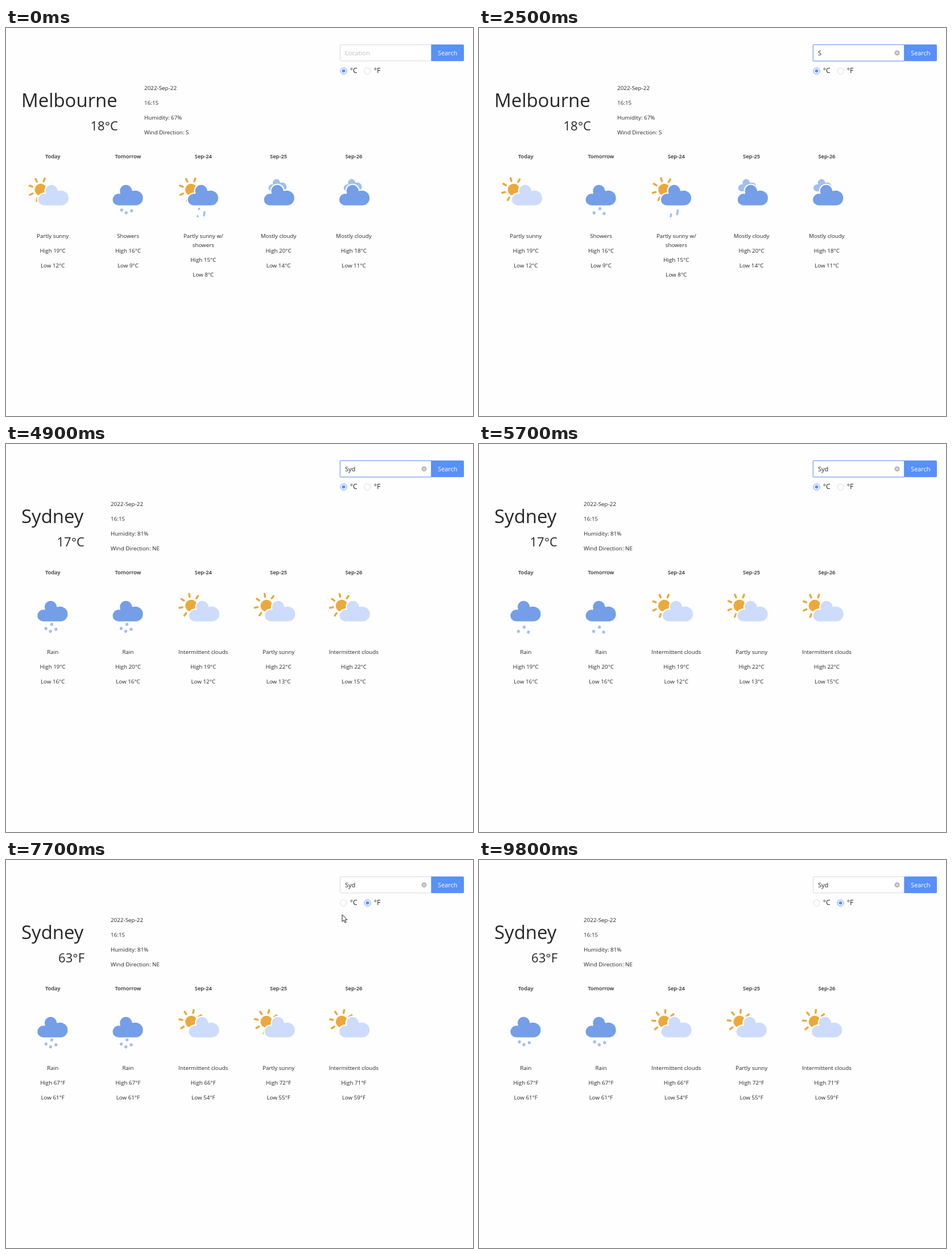
Recreate the animation shown at these times as an HTML page. Size 821x682 px, loop 9900 ms.

```html
<!DOCTYPE html>
<html lang="en">
<head>
<meta charset="utf-8">
<title>Weather</title>
<style>
  html, body { margin: 0; width: 100%; height: 100%; overflow: hidden; background: #fefefe; }
  svg { display: block; width: 821px; height: 682px; font-family: "Open Sans", "Noto Sans", sans-serif; }
</style>
</head>
<body>
<svg id="stage" viewBox="0 0 821 682"></svg>
<script>
const LOOP = 9900, TICK = 100;
const HOLDS = [13, 23, 35, 47, 58, 69, 81, 92]; // ticks that repeat the previous picture
const BLUE = '#5990f9', INK = '#262626', SUN = '#eba93b';
const CLOUD = '#749ee8', PALE = '#cddcfc', SOFT = '#a0bef4';
const CLOUD_PATH = 'M47.7 35.4c0-4.6-3.7-8.2-8.2-8.2c-1 0-1.9.2-2.8.5c-.3-3.4-3.1-6.2-6.6-6.2c-3.7 0-6.7 3-6.7 6.7c0 .8.2 1.6.4 2.3c-.3-.1-.7-.1-1-.1c-3.7 0-6.7 3-6.7 6.7c0 3.4 2.9 6.2 6.5 6.2l17.2 0C44.2 43.3 47.7 39.8 47.7 35.4z';

// Icon clocks: some icons were loaded before the loop, others with the second city.
const EARLY = -26.37, LATE = 4.03;
const DAYS = ['Today', 'Tomorrow', 'Sep-24', 'Sep-25', 'Sep-26'];
// label, icon, clock start, high and low in °C, high and low in °F
const MELBOURNE = {
  name: 'Melbourne', right: 197, info: 243, humidity: 67, wind: 'S', now: [18, 64],
  days: [
    ['Partly sunny', partlySunny, EARLY, 19, 12],
    ['Showers', rain, EARLY, 16, 9],
    ['Partly sunny w/|showers', sunShowers, EARLY, 15, 8],
    ['Mostly cloudy', cloudy, EARLY, 20, 14],
    ['Mostly cloudy', cloudy, EARLY, 18, 11]
  ]
};
const SYDNEY = {
  name: 'Sydney', right: 138, info: 184, humidity: 81, wind: 'NE', now: [17, 63],
  days: [
    ['Rain', rain, LATE, 19, 16, 67, 61],
    ['Rain', rain, LATE, 20, 16, 67, 61],
    ['Intermittent clouds', partlySunny, LATE, 19, 12, 66, 54],
    ['Partly sunny', partlySunny, EARLY, 22, 13, 72, 55],
    ['Intermittent clouds', partlySunny, LATE, 22, 15, 71, 59]
  ]
};
// Pointer path: time in s, x, y
const VISITS = [
  [[.2, 819, 24], [.5, 780, 38], [.9, 650, 44], [1.2, 628, 45]],
  [[5.9, 622, 46], [6.4, 639, 72], [6.9, 639, 72], [7.2, 622, 84], [7.5, 591, 96],
   [7.7, 591, 96], [7.9, 600, 55], [8, 604, 44], [8.2, 612, 6], [8.3, 615, -16]]
];

const clamp = v => Math.max(0, Math.min(1, v));
const wave = (s, period) => 1 - Math.abs(2 * (s % period) / period - 1);
const group = (transform, body) => `<g transform="${transform}">${body}</g>`;
const text = (x, y, size, str, attrs = '') =>
  `<text x="${x}" y="${y}" font-size="${size}" fill="${INK}" ${attrs}>${str}</text>`;
const middle = 'text-anchor="middle"';

let shaded = false; // soft shadows and rules show only briefly

function cloud(fill, transform) {
  const shape = `<path d="${CLOUD_PATH}" fill="${fill}" stroke="#fefefe" stroke-width="1.2" stroke-linejoin="round"/>`;
  const shadow = `<path d="${CLOUD_PATH}" fill="#f2f2f5" transform="translate(0 4)"/>`;
  return group(transform, (shaded ? shadow : '') + shape);
}
const frontCloud = (fill, dx = 0) => cloud(fill, `translate(${dx} -1)`);

function sun(s) {
  let rays = '';
  for (let a = 0; a < 360; a += 45) rays += `<path d="M0 9v3" transform="rotate(${a})"/>`;
  return group(`translate(20 26) rotate(${40 * s})`,
    `<g stroke="${SUN}" stroke-width="2" stroke-linecap="round">${rays}</g><circle r="6" fill="${SUN}"/>`);
}

function drops(s, x, lines, dash, width) {
  const body = lines.map(([dx, dy, delay]) => {
    const shift = -12.5 * (Math.max(0, s - delay) % 8);
    return `<path d="M0 0v8" transform="translate(${dx} ${dy})" stroke-dasharray="${dash}" stroke-dashoffset="${shift}"/>`;
  }).join('');
  return group(`translate(${x} 45) rotate(10)`,
    `<g stroke="${SOFT}" stroke-width="${width}" stroke-linecap="round">${body}</g>`);
}

function partlySunny(s) { return sun(s) + frontCloud(PALE, 2 * wave(s, 3)); }
function rain(s) {
  return frontCloud(CLOUD) + drops(s, 31, [[-5, 1, 0], [0, -1, .25], [5, 0, 0]], '.1 7', 3);
}
function sunShowers(s) {
  return sun(s) + frontCloud(CLOUD) + drops(s, 34, [[-6, 1, 0], [0, -1, .25]], '4 7', 2);
}
function cloudy(s) {
  return cloud(SOFT, `translate(${5 + 15 * wave(s, 7)} 2) scale(.6)`) + frontCloud(CLOUD, 2 * wave(s, 3));
}

function forecast(city, t, unit) {
  return city.days.map(([label, icon, start, ...temps], i) => {
    const x = 82.2 + 132.3 * i, lines = label.split('|');
    const [high, low] = unit === 'F' ? temps.slice(2) : temps;
    const y = 369.3 + 16 * (lines.length - 1);
    return text(x, 229.3, 9.35, DAYS[i], middle + ' font-weight="600"')
      + (shaded ? `<path d="M${x - 54} 239.5h108" stroke="#f3f3f3"/>` : '')
      + group(`translate(${x - 56.2} 238.8) scale(1.75)`, icon(Math.max(0, t - start)))
      + lines.map((line, n) => text(x, 369.3 + 16 * n, 9.75, line, middle)).join('')
      + text(x, y + 26, 9.8, `High ${high}°${unit}`, middle)
      + text(x, y + 52, 9.8, `Low ${low}°${unit}`, middle);
  }).join('');
}

function header(city, unit) {
  const info = ['2022-Sep-22', '16:15', `Humidity: ${city.humidity}%`, `Wind Direction: ${city.wind}`];
  return text(27, 139, 32.9, city.name)
    + text(city.right, 180, 22, `${city.now[unit === 'F' ? 1 : 0]}°${unit}`, 'text-anchor="end"')
    + info.map((line, i) => text(city.info, 108.6 + 26.1 * i, 9.85, line)).join('');
}

function radio(x, label, on, hover) {
  return `<circle cx="${x}" cy="75.5" r="5.6" fill="#fff" stroke="${on || hover ? BLUE : '#d9d9d9'}"/>`
    + (on ? `<circle cx="${x}" cy="75.5" r="3" fill="${BLUE}"/>` : '')
    + text(x + 11.3, 79.3, 12.3, label);
}

function searchBar(t) {
  const typed = 'Syd'.slice(0, (t >= 2) + (t >= 2.6) + (t >= 3.2));
  const focus = clamp((t - 1) / .2) * clamp((6.7 - t) / .3);
  const lastKey = [3.2, 2.6, 2, 1.2].find(k => t >= k);
  const caret = t >= 1.2 && t < 6.4 && (t - lastKey + .001) % 1 < .5;
  const caretX = [596.5, 602.5, 608.5, 614.8][typed.length];
  const box = 'x="587.5" y="29.5" width="160" height="28.4" rx="1.5"';
  return (focus > .5 ? `<rect ${box} fill="none" stroke="${BLUE}" stroke-width="3" opacity="${.25 * focus}"/>` : '')
    + `<rect ${box} fill="#fff" stroke="#d9d9d9"/>`
    + `<rect ${box} fill="none" stroke="${BLUE}" opacity="${.7 * focus}"/>`
    + `<path d="M747.5 29h55.5q2 0 2 2v25.3q0 2-2 2h-55.5z" fill="${BLUE}"/>`
    + `<text x="776.3" y="48.3" font-size="10.9" fill="#fff" ${middle}>Search</text>`
    + (typed ? text(596, 48.4, 11, typed)
      + '<circle cx="735" cy="43.8" r="4.5" fill="#b8b8b8"/><path d="M733.4 42.2l3.2 3.2m0-3.2l-3.2 3.2" stroke="#fff"/>'
      : '<text x="596" y="48.4" font-size="11" fill="#bfbfbf">Location</text>')
    + (caret ? `<path d="M${caretX} 36.5v15.5" stroke="#222"/>` : '');
}

function pointer(t) {
  const path = VISITS.find(v => t >= v[0][0] - .001 && t <= v[v.length - 1][0] + .001);
  if (!path) return '';
  const i = Math.max(1, path.findIndex(p => p[0] >= t - .001));
  const [t0, x0, y0] = path[i - 1], [t1, x1, y1] = path[i];
  const k = clamp((t - t0) / (t1 - t0)), x = x0 + (x1 - x0) * k, y = y0 + (y1 - y0) * k;
  const inBar = y > 29 && y < 58;
  const onButton = inBar && x > 748 && x < 805;
  const onRadio = y > 66 && y < 83 && x > 628 && x < 660;
  let shape = '<path d="M0 0v12.5l3-2.8l2 4.4l2-.9l-2-4.2h4z" fill="#fff" stroke="#222"/>';
  if (onButton || onRadio)
    shape = '<path d="M-1.3 9V1.2Q0-.6 1.3 1.2V6Q2.8 4.8 3.8 6.4Q5.2 5.6 6 7Q7.6 6.8 7.6 8.6V11.5Q7.4 14 6 16H-.5Q-1.5 13.8-4.3 10.6Q-5 8.6-3.2 8.4Q-2 8.5-1.3 9.6M1.3 6v3M3.8 6.4V9M6 7v2.5" fill="#fff" stroke="#222"/>';
  else if (inBar && x > 587)
    shape = '<path d="M-2.5-7.5H2.5M0-7.5V7.5M-2.5 7.5H2.5" fill="none" stroke="#222"/>';
  return group(`translate(${x} ${y})`, shape);
}

function draw(step) {
  const t = (HOLDS.includes(step) ? step - 1 : step) * TICK / 1000;
  const city = t < 4.1 ? MELBOURNE : SYDNEY;
  const unit = t < 6.5 ? 'C' : 'F', picked = t < 6.7 ? 'C' : 'F';
  shaded = t >= 6.5 && t < 7;
  stage.innerHTML = header(city, unit) + forecast(city, t, unit) + searchBar(t)
    + radio(593.5, '°C', picked === 'C') + radio(635.5, '°F', picked === 'F', t >= 6.4 && t < 7)
    + pointer(t);
}

const stage = document.getElementById('stage');
const begin = performance.now();
let shown = -1;
function frame() {
  const step = Math.floor((performance.now() - begin) % LOOP / TICK);
  if (step !== shown) draw(shown = step);
  requestAnimationFrame(frame);
}
frame();
</script>
</body>
</html>
```
